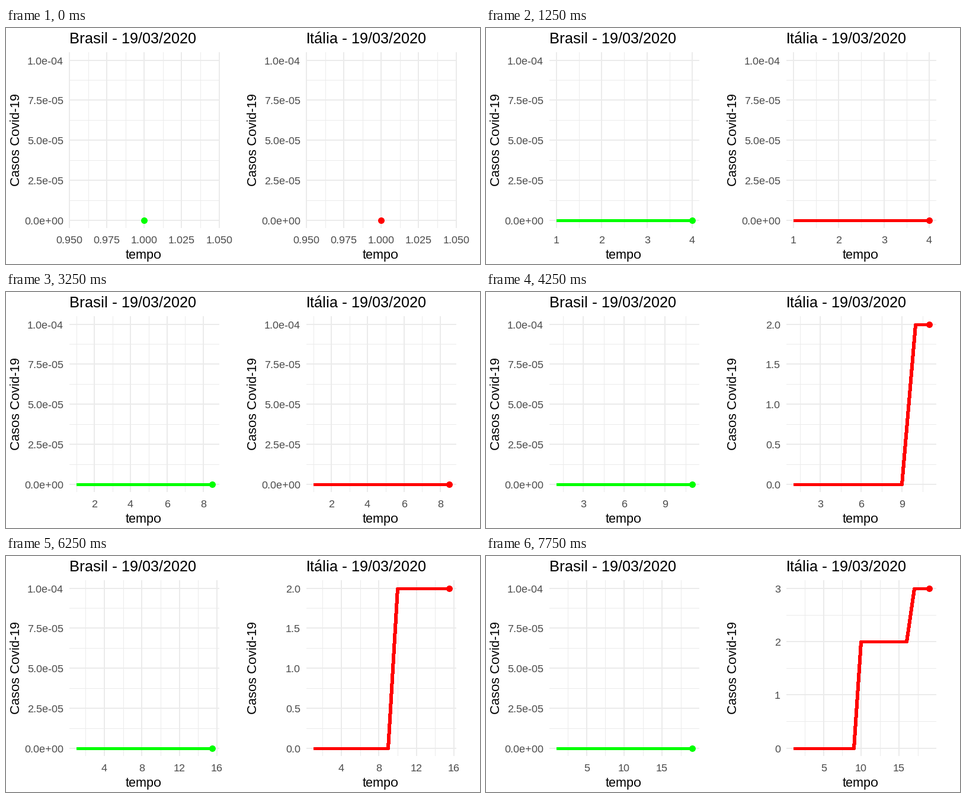
These frames come from a looping animation (800 px wide and 400 px high, 8000 ms). A matplotlib script:

```python
import math
import numpy as np
import matplotlib.pyplot as plt
from matplotlib.animation import FuncAnimation
from matplotlib.patches import Circle

plt.rcParams.update({
    "font.family": "Liberation Sans",
    "text.hinting": "native",
    "text.hinting_factor": 1,
})

W, H, DPI = 800, 400, 100
PX = 72 / DPI
FRAMES, INTERVAL = 32, 250

LEFT, BOTTOM = 107.6, 339.6
PANEL_W, PANEL_H = 252.45, 298.1
GRID, TICK_TEXT = "#EBEBEB", "#4D4D4D"

# The full series has 58 days spread over 100 steps
DAYS = np.arange(1, 59)
DAY_STEPS = np.round((DAYS - 1) * 99 / 57)

PANELS = [
    (0, "Brasil - 19/03/2020", "#00FF00", [1, 19], [0, 0]),
    (400, "Itália - 19/03/2020", "#FF0000",
     [1, 9, 10, 16, 17, 19], [0, 0, 2, 2, 3, 3]),
]

fig = plt.figure(figsize=(W / DPI, H / DPI), dpi=DPI, facecolor="white")
ax = fig.add_axes([0, 0, 1, 1])


def extended_breaks(lo, hi, m=5):
    """Extended Wilkinson tick labelling."""
    steps = [1, 5, 2, 2.5, 4, 3]
    span = hi - lo
    eps = 1e-12
    best, found = -2, (lo, hi, 2)

    def score(simple, cover, dense):
        return 0.25 * simple + 0.2 * cover + 0.5 * dense + 0.05

    for j in range(1, 20):
        for i, q in enumerate(steps):
            simple_max = 2 - i / 5 - j
            if score(simple_max, 1, 1) < best:
                return np.linspace(*found)
            for k in range(2, 100):
                dense_max = 2 - (k - 1) / (m - 1) if k >= m else 1
                if score(simple_max, 1, dense_max) < best:
                    break
                z = math.ceil(math.log10(span / (k + 1) / j / q))
                while True:
                    step = j * q * 10.0 ** z
                    z += 1
                    extra = max(0, step * (k - 1) - span) / 2
                    cover_max = 1 - (extra / (0.1 * span)) ** 2
                    if score(simple_max, cover_max, dense_max) < best:
                        break
                    first = (math.floor(hi / step) - (k - 1)) * j
                    last = math.ceil(lo / step) * j
                    for start in range(first, last + 1):
                        a = start * step / j
                        b = a + step * (k - 1)
                        rest = a % step
                        zero = (min(rest, step - rest) < eps
                                and a <= 0 <= b)
                        simple = 1 - i / 5 - j + zero
                        cover = 1 - 0.5 * ((hi - b) ** 2 + (lo - a) ** 2) \
                            / (0.1 * span) ** 2
                        r = (k - 1) / (b - a)
                        rt = (m - 1) / (max(b, hi) - min(a, lo))
                        s = score(simple, cover, 2 - max(r / rt, rt / r))
                        if s > best:
                            best, found = s, (a, b, k)
    return np.linspace(*found)


def ticks(lo, hi):
    """Major breaks, minor breaks and a label function for one axis."""
    major = extended_breaks(lo, hi)
    half = (major[1] - major[0]) / 2
    minor = np.append(major - half, major[-1] + half)
    tol = (hi - lo) * 1e-6

    def inside(values):
        return [v for v in values if lo - tol <= v <= hi + tol]

    if abs(major).max() < 1e-3:
        spec = ".1e"
    else:
        places = next(d for d in range(8)
                      if np.allclose(np.round(major, d), major,
                                     rtol=0, atol=1e-8))
        spec = f".{places}f"

    def label(v):
        return format(0.0 if abs(v) < tol else v, spec)

    return inside(major), inside(minor), label


def expand(lo, hi):
    pad = 0.05 * (hi - lo)
    return lo - pad, hi + pad


def line(xs, ys, color, width):
    # Coordinates are already on the pixel grid, so snapping stays off
    ax.plot(xs, ys, color=color, lw=width * PX, antialiased=False,
            snap=False, solid_capstyle="butt", solid_joinstyle="round")


def text(x, y, s, size, color="black", **kw):
    kw = {"ha": "center", "va": "baseline", **kw}
    ax.text(x, y, s, fontsize=size * PX, color=color, **kw)


def draw_panel(dx, title, color, knots, cases, t):
    days = np.append(np.arange(1, math.ceil(t)), t)
    values = np.interp(days, knots, cases)
    x0, x1 = expand(1, t) if t > 1 else (0.95, 1.05)
    y0, y1 = expand(0, values.max() or 1e-4)
    left, right = math.floor(LEFT + dx), math.floor(LEFT + PANEL_W + dx)
    top, bottom = math.floor(BOTTOM - PANEL_H), math.floor(BOTTOM)

    def px(v):
        return np.floor(LEFT + dx + PANEL_W * (v - x0) / (x1 - x0))

    def py(v):
        return np.floor(BOTTOM - PANEL_H * (v - y0) / (y1 - y0))

    x_major, x_minor, x_label = ticks(x0, x1)
    y_major, y_minor, y_label = ticks(y0, y1)

    for v in y_minor:
        line([left, right], [py(v) + 0.5] * 2, GRID, 1)
    for v in x_minor:
        line([px(v) + 0.5] * 2, [top, bottom], GRID, 1)
    for v in y_major:
        line([left, right], [py(v)] * 2, GRID, 2)
        text(dx + 97, py(v) + 7, y_label(v), 18, TICK_TEXT, ha="right")
    for v in x_major:
        line([px(v)] * 2, [top, bottom], GRID, 2)
        text(px(v), 365, x_label(v), 18, TICK_TEXT)

    xs, ys = px(days), py(values) + 0.5
    if t > 1:
        line(xs, ys, color, 5)
    ax.add_patch(Circle((xs[-1] + 0.5, ys[-1]), 5.5, fc=color, lw=0,
                        zorder=3))

    text(dx + 107, 26, title, 26, ha="left")
    text(dx + 232, 391, "tempo", 22)
    text(dx + 23, 190, "Casos Covid-19", 22, rotation=90,
         rotation_mode="anchor")


def draw(frame):
    ax.clear()
    ax.set_xlim(0, W)
    ax.set_ylim(H, 0)
    ax.axis("off")
    t = float(np.interp(frame, DAY_STEPS, DAYS))
    for panel in PANELS:
        draw_panel(*panel, t)
    return []


anim = FuncAnimation(fig, draw, frames=FRAMES, interval=INTERVAL,
                     init_func=lambda: draw(0), repeat=True)
plt.show()
```
